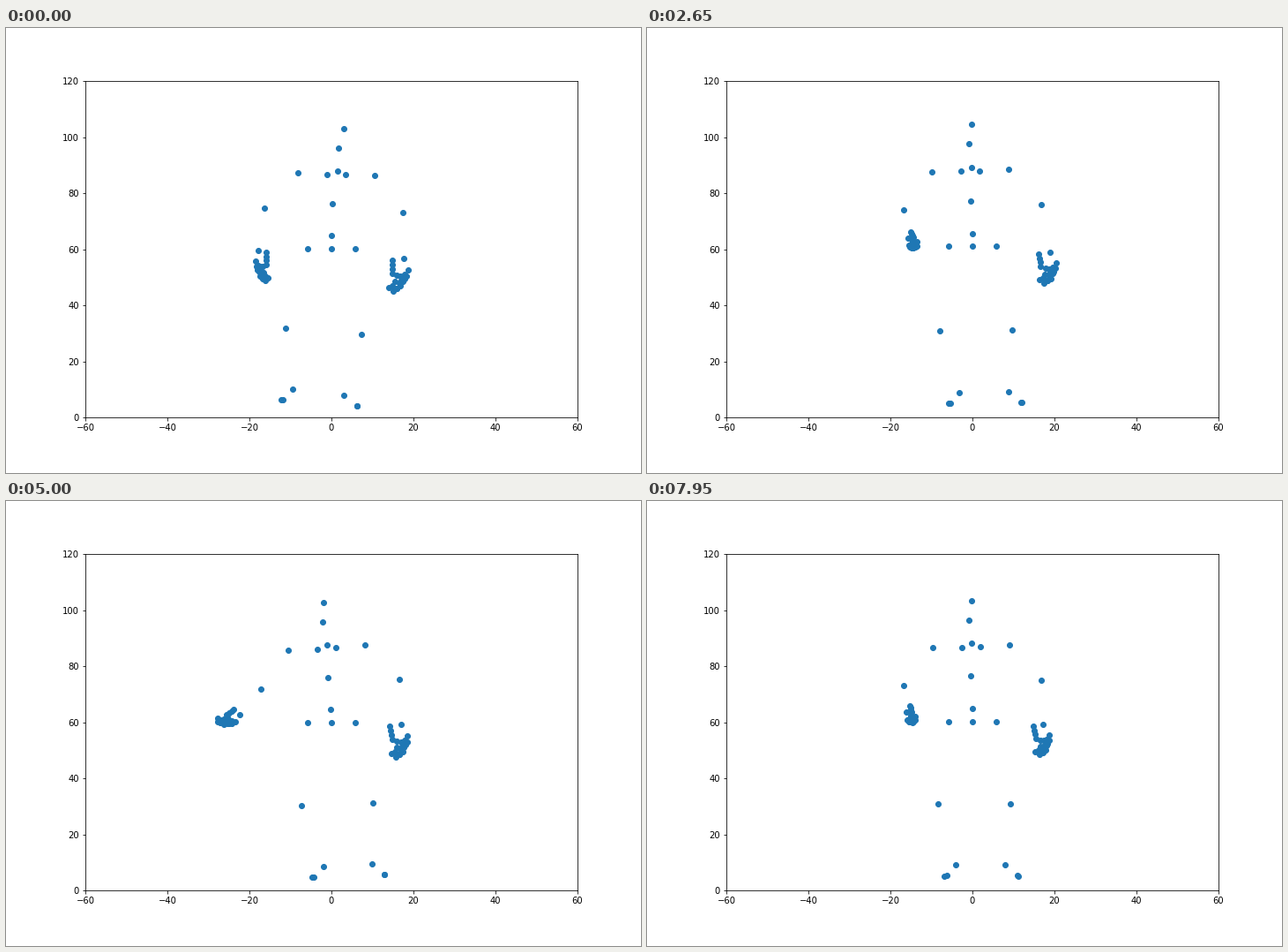
Write a matplotlib script that moves like this. It is 720 px wide and 504 px high and loops after 8000 ms.

```python
import numpy as np
import matplotlib.pyplot as plt
from matplotlib.animation import FuncAnimation

FRAMES, STEP = 160, 50
HIP_Y, TORSO = 250, 136

# Resting skeleton in pixels: centre x, half width (0 = single joint), y
SPINE = [(376, 0, 114), (371.4, 0, 136), (372, 0, 162), (371, 10.5, 166),
         (371, 43.5, 165.3), (370.5, 78.3, 206.5), (368.7, 0, 199),
         (369, 0, 235.3), (369, 0, HIP_Y), (369, 27, HIP_Y)]
LEGS = [(371, 41, 343.2), (378, 28, 412.3), (379, 41.7, 424.7), (380, 40.4, 424.3)]

# Left hand poses: thumb-side axis and finger axis as matrix columns
DOWN = (-.66, 0, 0, .93)
RAISED = (-.25, .18, .6, .45)
OUT = (.42, -.54, .54, .4)

SWAY = [(0, 7, -26), (1900, -13, 16), (3400, -4, -7), (5000, -16, 10),
        (6000, -23, 16), (7000, -17, 8), (7950, -8, 0)]
HEAD = [(0, 114), (1300, 107.5), (1900, 117), (2350, 106.5), (3400, 119),
        (4000, 113), (5000, 115), (5500, 106.5), (6000, 112), (7000, 113),
        (7400, 108.5), (7950, 113)]
LEFT = [(0, 286, 252, *DOWN), (850, 294, 237, *RAISED), (3400, 296, 238, *RAISED),
        (4600, 263, 243, *OUT), (5000, 265, 242, *OUT), (6000, 277, 264, *DOWN),
        (7000, 282, 262, *DOWN), (7700, 294, 239, *RAISED), (7950, 294, 239, *RAISED)]
# Right hand: time, wrist x, wrist y, width, slant, length
RIGHT = [(0, 451, 261, 1, 0, 1), (1900, 448, 252, .9, .18, .85),
         (2600, 457, 254, 1, .15, .95), (3400, 443, 248.5, .75, .07, .58),
         (5000, 448, 253, 1, .17, 1), (6000, 449, 250, 1, .14, 1.04),
         (7950, 449, 253, .9, .2, .93)]


def smooth_track(keys):
    """Sample keys for every frame with a curve that never overshoots."""
    keys = np.array(keys, float)
    t, v = keys[:, 0], keys[:, 1:]
    slope = np.diff(v, axis=0) / np.diff(t)[:, None]
    a, b = slope[:-1], slope[1:]
    same = a * b > 0
    inner = np.where(same, 2 * a * b / np.where(same, a + b, 1), 0)
    tangent = np.vstack((slope[:1], inner, slope[-1:]))

    now = np.arange(FRAMES) * STEP
    i = np.clip(np.searchsorted(t, now, side="right") - 1, 0, len(t) - 2)
    g = (t[i + 1] - t[i])[:, None]
    s = (now - t[i])[:, None] / g
    return ((1 + 2 * s) * (1 - s) ** 2 * v[i] + s * (1 - s) ** 2 * g * tangent[i]
            + s * s * (3 - 2 * s) * v[i + 1] + s * s * (s - 1) * g * tangent[i + 1])


def mirrored(joints):
    """Expand to rows of centre x, signed offset, y."""
    return np.array([(cx, side * w, y) for cx, w, y in joints
                     for side in ((-1, 1) if w else (0,))])


def hand_shape():
    """Wrist, straight thumb and four bent fingers, relative to the wrist."""
    dots = [(0, 0)] + [(-13, 2 + 5 * k) for k in range(4)]
    for f in range(4):
        knuckle = np.array((-8 + 4.3 * f, 20 - 1.3 * (f - .7) ** 2))
        tip = np.array((-17 + 4.6 * f, 37 - 3.4 * (f - 1.1) ** 2))
        for s in np.linspace(0, 1, 4):
            bend = np.sin(np.pi * s) * np.array((1.5, 3))
            dots.append(knuckle + (tip - knuckle) * s + bend)
    return np.array(dots)


def dip_gain(y):
    return np.maximum(0, .5 + .5 * (HIP_Y - y) / TORSO)


def torso(sway, dip):
    """Lean grows with height; shoulders and elbows tilt along."""
    cx, off, y = spine.T
    up = (HIP_Y - y) / TORSO
    tilt = .0045 * off * sway * (up > 0)
    return np.column_stack((cx + off + sway * up ** 1.55, y + tilt + dip * dip_gain(y)))


def lower(lean, dip):
    """Feet swing against the fixed hips, one side rising as the other drops."""
    cx, off, y = legs.T
    swing = np.where(y < 400, .42, .92)
    x = cx + off * (1 - .0015 * lean) + swing * lean
    return np.column_stack((x, y - .13 * np.sign(off) * lean + dip * dip_gain(y)))


def hand(x, y, xx, xy, yx, yy):
    return shape @ np.array([(xx, yx), (xy, yy)]) + (x, y)


spine, legs, shape = mirrored(SPINE), mirrored(LEGS), hand_shape()
body, head, left, right = map(smooth_track, (SWAY, HEAD, LEFT, RIGHT))


def points(n):
    sway, lean = body[n]
    dip = head[n, 0] - 114
    x, y, width, slant, length = right[n]
    px = np.vstack((torso(sway, dip), lower(lean, dip), hand(*left[n]),
                    hand(x, y, width, slant, 0, length)))
    return (px - (369, 441)) / (4.65, -3.171)


fig, ax = plt.subplots(figsize=(10, 7), dpi=72)
fig.subplots_adjust(left=.125, right=.9, bottom=.125, top=.88)
ax.set_xlim(-60, 60)
ax.set_ylim(0, 120)
dots = ax.scatter(*points(0).T, color="#1f77b4")


def update(n):
    dots.set_offsets(points(n))
    return dots,


anim = FuncAnimation(fig, update, frames=FRAMES, interval=STEP,
                     repeat=True, repeat_delay=0)
plt.show()
```
